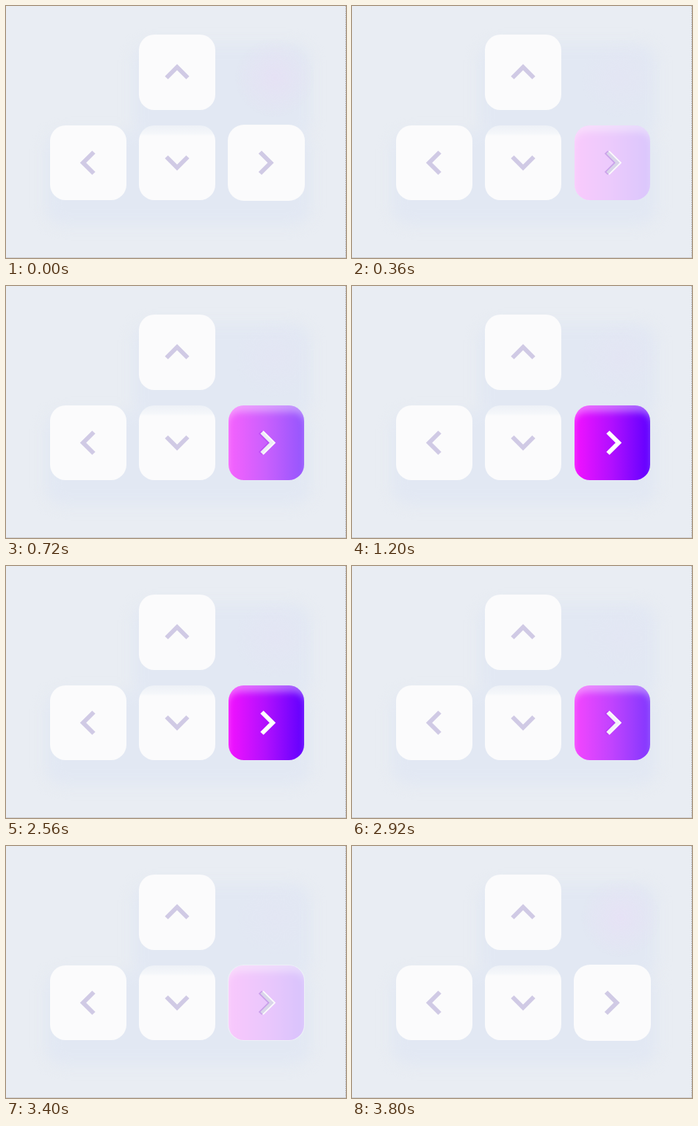
An HTML page that plays this animation: 463 by 344 pixels, repeating every 5000 ms.

```html
<!DOCTYPE html>
<html lang="en">
<head>
<meta charset="utf-8">
<title>Arrow keys</title>
<style>
  html, body { margin: 0; width: 100%; height: 100%; overflow: hidden; background: #e9edf3; }
  svg { display: block; width: 463px; height: 344px; }
  .key { fill: #fbfbfc; }
  .arrow { fill: none; stroke: #d0cae5; stroke-width: 6; }
  .on { stroke: #fff; }
  .active { opacity: 0; animation: press 5s infinite; }
  .rest { animation: release 5s infinite; }
  .glow { animation: glow 5s linear infinite; }

  /* 0–1.2 s in, hold, 2.52–3.8 s out */
  @keyframes press {
    0% { opacity: 0; animation-timing-function: cubic-bezier(.37, 0, .63, 1); }
    24%, 50.4% { opacity: 1; animation-timing-function: cubic-bezier(.37, 0, .63, 1); }
    76%, 100% { opacity: 0; }
  }
  @keyframes release {
    0% { opacity: 1; }
    9%, 65% { opacity: 0; }
    76%, 100% { opacity: 1; }
  }
  @keyframes glow {
    0% { opacity: 1; }
    10%, 12% { opacity: .1; }
    15%, 56% { opacity: .4; }
    61%, 66% { opacity: .05; }
    76%, 100% { opacity: 1; }
  }
</style>
</head>
<body>
<svg viewBox="0 0 463 344">
  <defs>
    <filter id="soft" x="-20%" y="-20%" width="140%" height="140%" color-interpolation-filters="sRGB">
      <feGaussianBlur stdDeviation="9"/>
    </filter>
    <filter id="sheen" x="-30%" y="-30%" width="160%" height="160%" color-interpolation-filters="sRGB">
      <feGaussianBlur stdDeviation="5"/>
    </filter>
    <linearGradient id="neon">
      <stop offset="0" stop-color="#f312ff"/>
      <stop offset=".5" stop-color="#b00fff"/>
      <stop offset="1" stop-color="#5f00ff"/>
    </linearGradient>
    <linearGradient id="lid" x2="0" y2="1">
      <stop offset="0" stop-color="#edf1f7"/>
      <stop offset=".11" stop-color="#f5f7fa"/>
      <stop offset=".14" stop-color="#fbfbfc"/>
    </linearGradient>
    <radialGradient id="lilac">
      <stop offset="0" stop-color="#e6e2f5"/>
      <stop offset="1" stop-color="#e6e2f5" stop-opacity="0"/>
    </radialGradient>
    <clipPath id="face"><rect x="303" y="163" width="103" height="102" rx="21"/></clipPath>
  </defs>

  <rect width="463" height="344" fill="#e9edf3"/>
  <g filter="url(#soft)" fill="#e2e8f3">
    <rect x="173" y="51" width="242" height="130" rx="24"/>
    <rect x="54" y="172" width="361" height="127" rx="24"/>
  </g>
  <ellipse class="glow" cx="366" cy="98" rx="54" ry="54" fill="url(#lilac)"/>

  <rect class="key" x="181" y="39" width="104" height="103" rx="21"/>
  <rect class="key" x="60" y="163" width="104" height="102" rx="21"/>
  <rect x="181" y="163" width="104" height="102" rx="21" fill="url(#lid)"/>
  <path class="arrow" d="M218.5 98 233 83.5 247.5 98"/>
  <path class="arrow" d="M119.5 199.5 105 214 119.5 228.5"/>
  <path class="arrow" d="M218.5 206 233 220.5 247.5 206"/>

  <rect class="key rest" x="302" y="162" width="105" height="104" rx="22"/>
  <rect class="key" x="303" y="163" width="103" height="102" rx="21"/>
  <path class="arrow" d="M346 199.5 360.5 214 346 228.5"/>

  <g class="active">
    <g clip-path="url(#face)">
      <rect x="303" y="163" width="103" height="102" fill="url(#neon)"/>
      <path filter="url(#sheen)" fill="#fff" fill-opacity=".38" fill-rule="evenodd"
        d="M280 140H429V300H280ZM301 192Q301 172 321 172H388Q408 172 408 192V290H301Z"/>
    </g>
    <path class="arrow on" d="M348.5 199.5 363 214 348.5 228.5"/>
  </g>

  <path d="M462.5 0V343" stroke="#b9bbc1" stroke-dasharray="2 1"/>
  <path d="M0 343.5H463" stroke="#cfd1d5"/>
</svg>
</body>
</html>
```
